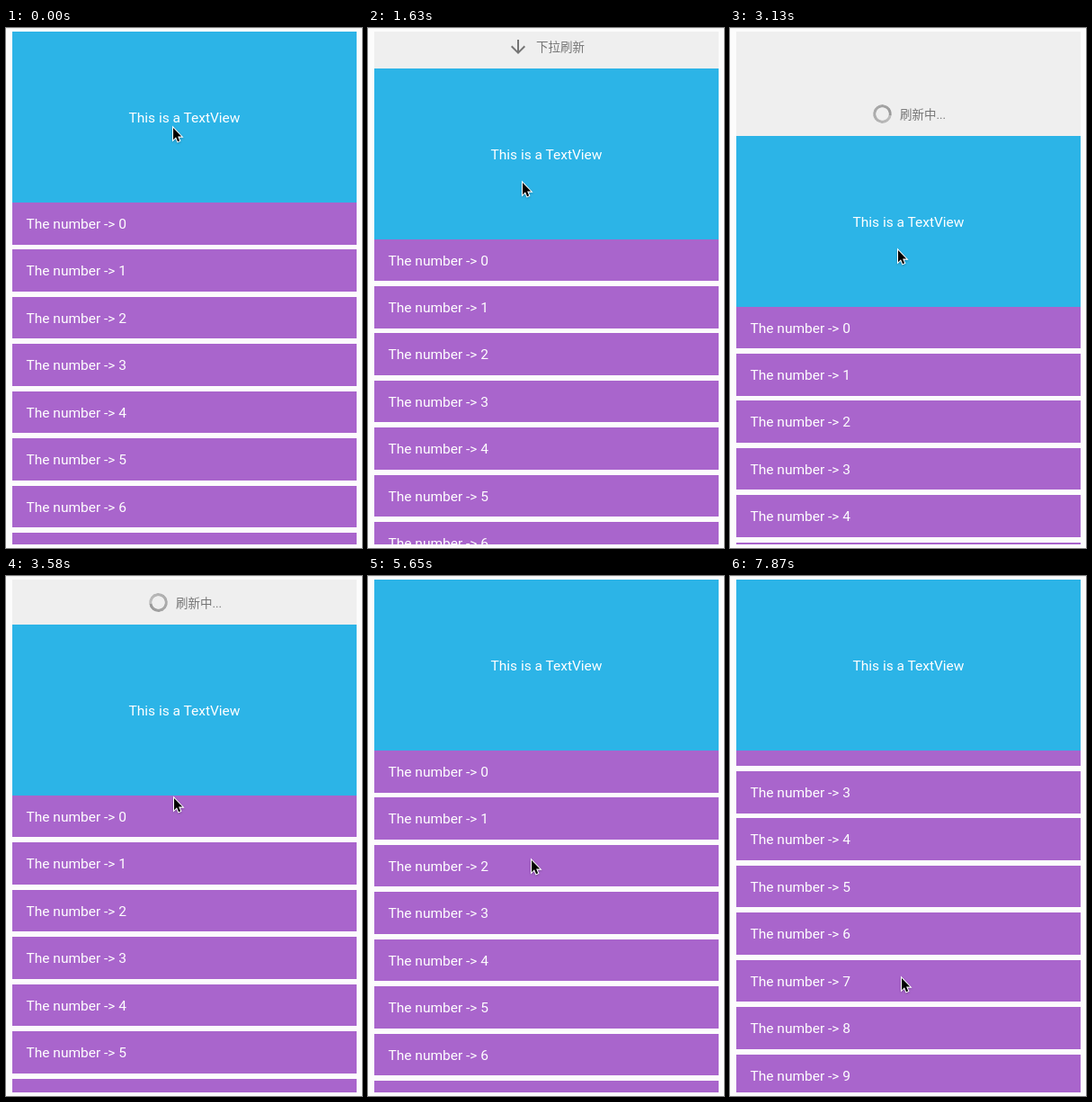
An HTML page for the animation above (8000 ms loop, 396x578 px).

```html
<!DOCTYPE html>
<html lang="en">
<head>
<meta charset="utf-8">
<title>Pull to refresh</title>
<style>
  html, body { margin: 0; width: 100%; height: 100%; overflow: hidden; background: #fcfcfc; }
  body { position: relative; font: 15.5px Roboto, sans-serif; color: #fff; }
  body::before { content: ""; position: absolute; top: 0; left: 0; right: 0; height: 1px; background: #f0f0f0; }
  #view { position: absolute; left: 7px; top: 4px; width: 383px; height: 570px; overflow: hidden; }
  #view > * { position: absolute; left: 0; width: 383px; }
  #list { height: 700px; }
  .row { position: absolute; left: 0; width: 367.5px; height: 46.5px; padding-left: 15.5px; line-height: 48px; background: #a965cc; }
  #pull { top: 0; overflow: hidden; background: #efefef; color: #757575; font: 13.5px/20px Roboto, "Noto Sans CJK SC", "Noto Sans CJK", sans-serif; }
  #pull > * { position: absolute; }
  #label { bottom: 14px; white-space: nowrap; }
  #arrow { left: 148px; bottom: 12px; width: 24px; height: 24px; fill: #757575; }
  #ring {
    left: 152px; bottom: 13.5px; width: 21px; height: 21px; border-radius: 50%;
    background: conic-gradient(#bebebe, #999);
    -webkit-mask: radial-gradient(circle, transparent 6.9px, #000 7.5px);
    mask: radial-gradient(circle, transparent 6.9px, #000 7.5px);
  }
  #banner { height: 190px; line-height: 193px; text-align: center; background: #2cb4e7; }
  #cursor { position: absolute; left: .5px; top: 1px; width: 16px; height: 24px; overflow: visible; filter: drop-shadow(0 1px 1px rgba(0, 0, 0, .25)); }
</style>
</head>
<body>
<div id="view">
  <div id="list"></div>
  <div id="pull">
    <svg id="arrow" viewBox="0 0 24 24"><path d="M20 12l-1.41-1.41L13 16.17V4h-2v12.17l-5.58-5.59L4 12l8 8z"/></svg>
    <div id="ring"></div>
    <span id="label"></span>
  </div>
  <div id="banner">This is a TextView</div>
</div>
<svg id="cursor"><path transform="scale(.85)" d="M0 0V15.5L3.6 12.2 6 17.8 8.4 16.8 6 11.3H10.8Z" stroke="#fff" stroke-width="2.4" paint-order="stroke"/></svg>
<script>
const LOOP = 8000, STEP = 148.6;
const GRIP_Y = 130.4, REST = 48.6;
const RELEASE = 21, DONE = 31;

const home = { x: 185, y: 110 };
const moves = [
  { from: 2, to: 6, x: 157, y: 55 },
  { from: 7, to: 11, x: 171, y: 171 },
  { from: 11, to: 15, x: 184, y: 236 },
  { from: 16, to: 20, x: 186, y: 246 },
  { from: DONE, to: 38, x: 181, y: 315 },
  { from: 38, to: 41, x: 176, y: 414 },
  { from: 41, to: 47, x: 163, y: 292 },
  { from: 47, to: 49, x: 190, y: 437 },
  { from: 51, to: 53, x: 190, y: 446 }
];

const $ = id => document.getElementById(id);
const list = $('list'), pull = $('pull'), arrow = $('arrow'), ring = $('ring');
const label = $('label'), banner = $('banner'), cursor = $('cursor');

for (let i = 0; i < 12; i++) {
  const row = document.createElement('div');
  row.className = 'row';
  row.style.top = i * 52.45 + 'px';
  row.textContent = `The number -> ${i}`;
  list.append(row);
}

const mix = (a, b, u) => a + (b - a) * u;
const ramp = (k, from, to) => Math.min(1, Math.max(0, (k - from) / (to - from)));
const easeOut = (k, from, to) => 1 - (1 - ramp(k, from, to)) ** 2;

function mouseAt(k) {
  return moves.reduce((p, m) => {
    const u = ramp(k, m.from, m.to);
    return { x: mix(p.x, m.x, u), y: mix(p.y, m.y, u) };
  }, home);
}

// Follows the finger, springs back to REST, then closes.
function pullAt(k) {
  const dragged = Math.max(0, mouseAt(Math.min(k, RELEASE)).y - GRIP_Y);
  const settled = mix(dragged, REST, easeOut(k, RELEASE, RELEASE + 3.5));
  return settled * (1 - easeOut(k, DONE, DONE + 3));
}

// Drag up, short fling, then a small drag down.
function scrollAt(k) {
  return 121.3 * ramp(k, 41, 47) + 22 * easeOut(k, 47, 49) - 9 * ramp(k, 51, 53);
}

function draw(t) {
  const k = Math.floor((t + 6) / STEP);
  const { x, y } = mouseAt(k);
  const offset = pullAt(k);
  const busy = k >= RELEASE, ready = offset > REST;

  cursor.style.transform = `translate(${x}px, ${y}px)`;
  banner.style.top = offset + 'px';
  list.style.top = 190 + offset - scrollAt(k) + 'px';
  pull.style.height = offset + 'px';
  arrow.style.display = busy ? 'none' : '';
  arrow.style.transform = ready ? 'rotate(180deg)' : '';
  ring.style.display = busy ? '' : 'none';
  ring.style.transform = `rotate(${(k - RELEASE) * 54 + 100}deg)`;
  label.style.left = busy ? '182px' : '180px';
  label.textContent = busy ? '刷新中...' : ready ? '释放刷新' : '下拉刷新';
}

const start = performance.now();
function tick() {
  draw((performance.now() - start) % LOOP);
  requestAnimationFrame(tick);
}
tick();
</script>
</body>
</html>
```
